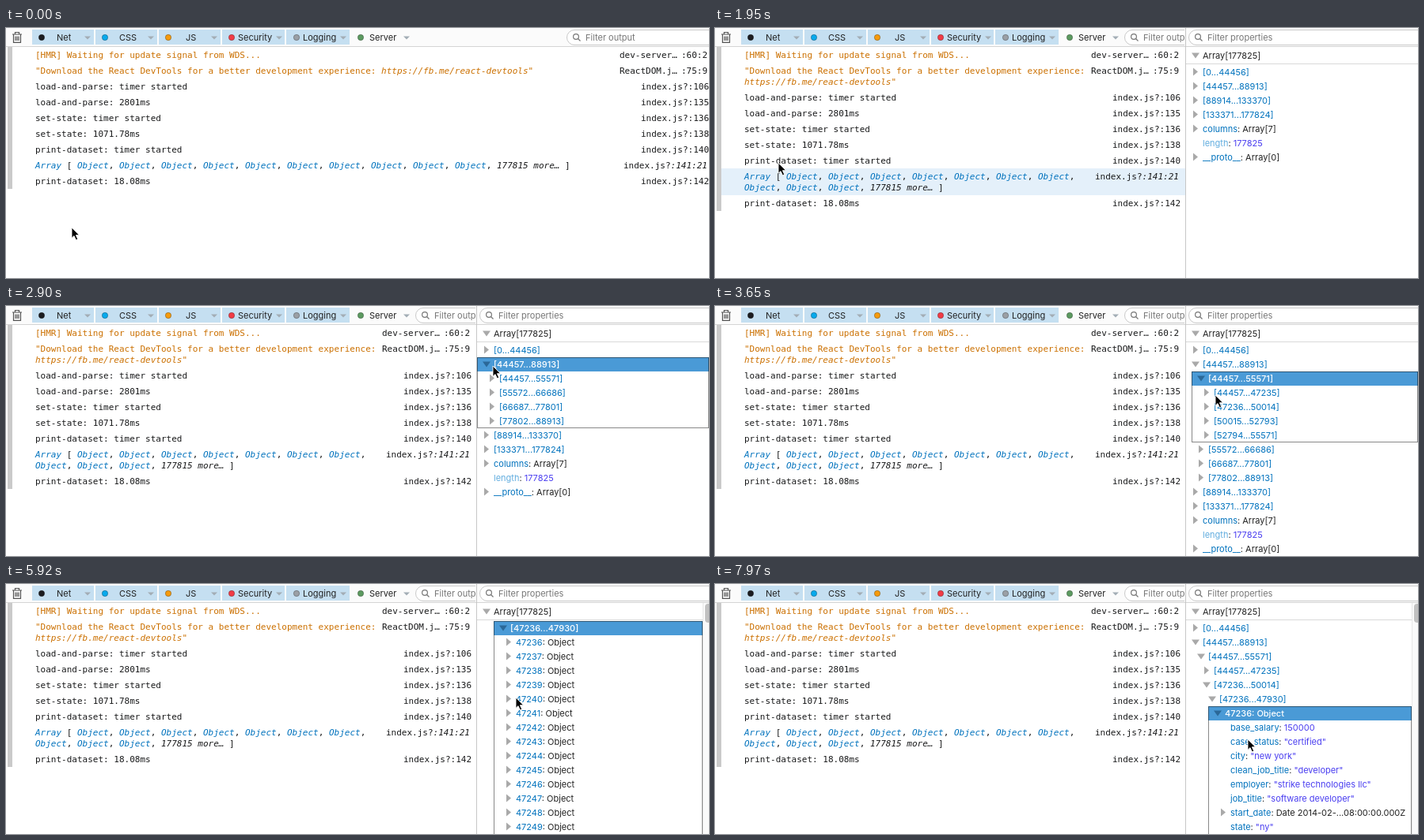
Recreate the animation shown at these times as an HTML page. Size 888 px wide and 317 px high, loop 8000 ms.

```html
<!DOCTYPE html>
<html lang="en">
<head>
<meta charset="utf-8">
<title>Console inspector</title>
<style>
  html, body { margin: 0; width: 100%; height: 100%; overflow: hidden; background: #fff; }
  svg { display: block; }
  text { white-space: pre; font: 11px Inter, sans-serif; fill: #222; }
  .mono text { font-family: "DejaVu Sans Mono", monospace; fill: #18191a; }
  .mono .warn { fill: #cb7000; }
  .blue { fill: #0072bd; }
  .red { fill: #e0301e; }
  .num { fill: #4a3ef0; }
  .dim { fill: #62addf; }
  .hint { fill: #777; }
  .it { font-style: italic; }
  .sel, .sel * { fill: #fff; font-weight: 500; }
</style>
</head>
<body>
<svg width="888" height="317" viewBox="0 0 888 317">
  <defs>
    <clipPath id="left"><rect width="593" height="317"/></clipPath>
    <clipPath id="tree"><rect x="595" y="46" width="293" height="271"/></clipPath>
  </defs>
  <g id="view"></g>
  <path id="arrow" d="M0 0V13.4L3 10.6 5.4 15.8 7.7 14.8 5.4 9.7H9.6Z" stroke="#fff" stroke-width=".9"/>
  <path id="hand" fill="#fff" stroke="#000" stroke-width="1.1" stroke-linejoin="round"
    d="M-2 1Q-1.700-.5-.2 0 .8.400 1.100 2L2 6Q3-.0 4.600 6.200 6 5.500 6.600 7 8.500 6.500 8.800 9V12Q8.600 14 7.500 15.500V17.500H0V16Q-2-.0-3.500 12-5 9.800-4 9.200-2.800 8.800-1 11Z"/>
</svg>
<script>
const LOOP = 8000;
const $ = id => document.getElementById(id);

// time, x, y of the pointer tip
const path = [
  [380, 83, 253], [700, 76, 215], [980, 66, 173], [1040, 65, 172], [1920, 65, 172],
  [1950, 78, 171], [2080, 330, 130], [2220, 601, 87], [2300, 622, 74], [2410, 614, 73],
  [2860, 614, 73], [3050, 618, 87], [3120, 620, 93], [3460, 620, 93], [3650, 632, 113],
  [3800, 633, 127], [3860, 633, 129], [4420, 633, 129], [4580, 640, 142], [4980, 640, 142],
  [5060, 644, 144], [6880, 644, 144], [7230, 638, 166], [7860, 638, 166], [7970, 673, 197]
];
// time, opened levels, selected level, scroll
const stages = [
  [1460, 0, 0, 0], [2580, 1, 1, 0], [3180, 2, 2, 0], [4080, 3, 3, 0], [5890, 3, 4, 0],
  [5920, 4, 4, 90], [6580, 4, 4, 0], [7410, 4, 5, 0], [7440, 5, 5, 0]
];

function tip(t) {
  const i = path.findIndex(p => p[0] > t);
  if (i < 1) return path[i ? path.length - 1 : 0].slice(1);
  const [t0, x0, y0] = path[i - 1], [t1, x1, y1] = path[i], k = (t - t0) / (t1 - t0);
  return [x0 + (x1 - x0) * k, y0 + (y1 - y0) * k];
}

const span = (cls, s) => `<tspan class="${cls}">${s}</tspan>`;
const text = (x, y, s, cls = '') => `<text x="${x}" y="${y}" class="${cls}">${s}</text>`;
const rect = (x, y, w, h, fill, more = '') =>
  `<rect x="${x}" y="${y}" width="${w}" height="${h}" fill="${fill}" ${more}/>`;

// Console
const object = span('blue it', 'Object') + ', ';
const arrayHead = span('blue it', 'Array') + ' [ ';
const arrayTail = span('it', '177815 more…') + ' ]';
const advice = '"Download the React DevTools for a better development experience: ';
const link = span('it', 'https://fb.me/react-devtools') + '"';
const plain = (s, line) => ({ wide: [s], file: 'index.js?', line, x: 502, lx: 561.6 });
const messages = [
  { wide: ['[HMR] Waiting for update signal from WDS...'], cls: 'warn', file: 'dev-server…', line: ':60:2', x: 475, lx: 553 },
  { wide: [advice + link], narrow: [advice, link], cls: 'warn', file: 'ReactDOM.j…', line: ':75:9', x: 475, lx: 553 },
  plain('load-and-parse: timer started', ':106'),
  plain('load-and-parse: 2801ms', ':135'),
  plain('set-state: timer started', ':136'),
  plain('set-state: 1071.78ms', ':138'),
  plain('print-dataset: timer started', ':140'),
  { wide: [arrayHead + object.repeat(10) + arrayTail],
    narrow: [arrayHead + object.repeat(7), object.repeat(3) + arrayTail],
    file: 'index.js?', line: ':141:21', x: 480, lx: 539.6, lineCls: ' it' },
  plain('print-dataset: 18.08ms', ':142')
];

function layout(split) {
  let y = 24;
  return messages.map(m => {
    const lines = split && m.narrow || m.wide, h = 6 + 14 * lines.length;
    y += h;
    return { ...m, lines, y: y - h, h };
  });
}
const layouts = [layout(false), layout(true)];

function hovered(t, split) {
  if (t >= 1400 && t < 1965) return 7;
  const [x, y] = tip(t - 30);
  return x > 594 ? -1 : layouts[+split].findIndex(r => y >= r.y && y < r.y + r.h);
}

function consoleView(split, hover) {
  const rows = layouts[+split], last = rows[rows.length - 1], dx = split ? 0 : 300;
  return '<g class="mono">' + rows.map((r, i) =>
    (i == hover ? rect(8, r.y, 586 + dx, r.h, '#e4f0fa') : '') +
    r.lines.map((s, j) => text(37, r.y + 14 + 14 * j, s, r.cls)).join('') +
    text(r.x + dx, r.y + 14, r.file, 'blue') +
    text(r.lx + dx, r.y + 14, r.line, 'red' + (r.lineCls || ''))
  ).join('') + rect(2, 24, 6, last.y + last.h - 24, '#cacaca') + '</g>';
}

// Toolbar
const buttons = [
  ['Net', 33, 45, 64, 103, '#1c1c20'], ['CSS', 113, 125, 143, 183, '#08a9ec'],
  ['JS', 193, 205, 227, 263, '#f59a0c'], ['Security', 273, 285, 293, 345, '#f13b46'],
  ['Logging', 354, 367, 375, 426, '#9a9fa5'], ['Server', 0, 448, 459, 506, '#5c9a60']
];
const trash = `<g fill="none" stroke="#555" stroke-width="1.2">
  <path d="M8 8H20M11.500 7.500V5.500H16.500V7.500M9.500 8V18.400H18.500V8M12 10.500V16M14 10.500V16M16 10.500V16"/></g>`;

const filter = (x, label) =>
  rect(x + .5, 2.5, 330, 19, '#fff', 'rx="9.5" stroke="#c9c9c9"') +
  `<g fill="none" stroke="#777" stroke-width="1.2"><circle cx="${x + 12}" cy="11" r="3.4"/>
   <path d="M${x + 14.5} 13.5l3 3"/></g>` + text(x + 24, 16, label, 'hint');

function toolbar(split) {
  return rect(0, 0, 888, 23, '#fbfbfb') + rect(0, 23, 888, 1, '#d4d4d4') + trash +
    buttons.map(([s, bx, cx, tx, ax, c]) =>
      (bx ? rect(bx, 2, s == 'Logging' ? 80 : s == 'Security' ? 79 : 78, 19, '#c5dff1') : '') +
      `<circle cx="${cx}" cy="12" r="3.700" fill="${c}" stroke="#0005" stroke-width=".8"/>` +
      text(tx, 16, s) + `<path d="M${ax - 4} 10.500h8l-4 4z" fill="#a3adb5"/>`
    ).join('') +
    `<g ${split ? 'clip-path="url(#left)"' : ''}>${filter(split ? 517 : 708, 'Filter output')}</g>`;
}

// Property tree
const steps = [44457, 11115, 2779, 695];
const picks = [1, 0, 1, 0, 0];
const props = [
  ['base_salary', '150000'], ['case_status', '"certified"'], ['city', '"new york"'],
  ['clean_job_title', '"developer"'], ['employer', '"strike technologies llc"'],
  ['job_title', '"software developer"'], ['start_date', 'Date 2014-02-...08:00:00.000Z', 1],
  ['state', '"ny"'], ['visa_class', '"h-1b"']
];

function treeRows(open, sel) {
  const rows = [];
  const add = (level, key, val = '', twisty = true, valCls = '', keyCls = 'blue') =>
    rows.push({ level, twisty, s: span(keyCls, key) + (val && ': ' + span(valCls, val)) });
  const walk = (level, lo, hi) => {
    if (level == 5) return props.forEach(([k, v, date]) => add(5, k, v, !!date, date ? '' : 'num'));
    const step = steps[level] || 1;
    for (let i = 0, a = lo; a <= hi && i < 20; i++, a += step) {
      if (level < 4) add(level, `[${a}...${Math.min(a + step - 1, hi)}]`);
      else add(4, a, 'Object');
      if (i != picks[level]) continue;
      const row = rows[rows.length - 1];
      row.open = level < Math.max(open, sel);
      row.sel = level == sel - 1;
      if (level < open) walk(level + 1, a, Math.min(a + step - 1, hi));
      row.span = rows.length - rows.indexOf(row);
    }
  };
  walk(0, 0, 177824);
  add(0, 'columns', 'Array[7]');
  add(0, 'length', '177825', false, 'num', 'dim');
  add(0, '__proto__', 'Array[0]');
  return rows;
}

const twisty = (x, y, open, fill = '#a9a9a9') =>
  `<path d="${open ? `M${x - 5} ${y - 3.500}h10l-5 7z` : `M${x - 3} ${y - 5.500}v10l6-5z`}" fill="${fill}"/>`;

function tree(open, sel, scroll) {
  const right = open > 2 ? 880 : 888;
  let focus = '';
  const body = treeRows(open, sel).map((r, i) => {
    const y = 47 + 18 * i - scroll, x = 595 + 7 * r.level;
    if (y > 317 || y < 29) return '';
    if (r.sel) focus = rect(x + .5, y + .5, right - x - 1, 18 * r.span - 1, 'none',
      'stroke="#111" stroke-dasharray="1 1"');
    return (r.sel ? rect(x, y, right - x, 18, '#4a9ad6') : '') +
      (r.twisty ? twisty(x + 12, y + 9, r.open, r.sel ? '#2b6898' : undefined) : '') +
      text(x + 21, y + 13, r.s, r.sel ? 'sel' : '');
  }).join('');
  const bar = open > 2 ? rect(880, 24, 8, 293, '#fafafa') + rect(880, 24, 1, 293, '#e7e7e7') +
    rect(883, 25, 9, open > 3 ? 24 : 245, '#c1c1c1', 'rx="4"') : '';
  return twisty(607, 35, true) + text(616, 39, 'Array[177825]') + rect(595, 45, right - 595, 1, '#d9d9d9') +
    `<g clip-path="url(#tree)">${body}${focus}</g>${bar}`;
}

let shown;
function draw(t) {
  const split = t >= 1400, hover = hovered(t, split);
  const stage = stages.filter(s => s[0] <= t).pop();
  const key = [split, hover, stage].join();
  if (key != shown) {
    shown = key;
    $('view').innerHTML = rect(0, 24, 888, 293, '#fff') + consoleView(split, hover) + toolbar(split) +
      (split ? rect(594, 0, 294, 23, '#fbfbfb') + rect(594, 24, 294, 293, '#fff') +
        filter(598, 'Filter properties') + rect(594, 23, 294, 1, '#d4d4d4') + rect(594, 0, 1, 317, '#c6c6c6') : '') +
      (stage ? tree(...stage.slice(1)) : '');
  }
  const [x, y] = tip(t).map(Math.round);
  const pointing = t >= 1000 && t < 1950 || t >= 7100 && t < 7900;
  for (const id of ['arrow', 'hand']) {
    $(id).setAttribute('transform', `translate(${x} ${y})`);
    $(id).style.display = (id == 'hand') == pointing ? '' : 'none';
  }
}

const start = performance.now();
function tick() {
  draw((performance.now() - start) % LOOP);
  requestAnimationFrame(tick);
}
tick();
</script>
</body>
</html>
```
